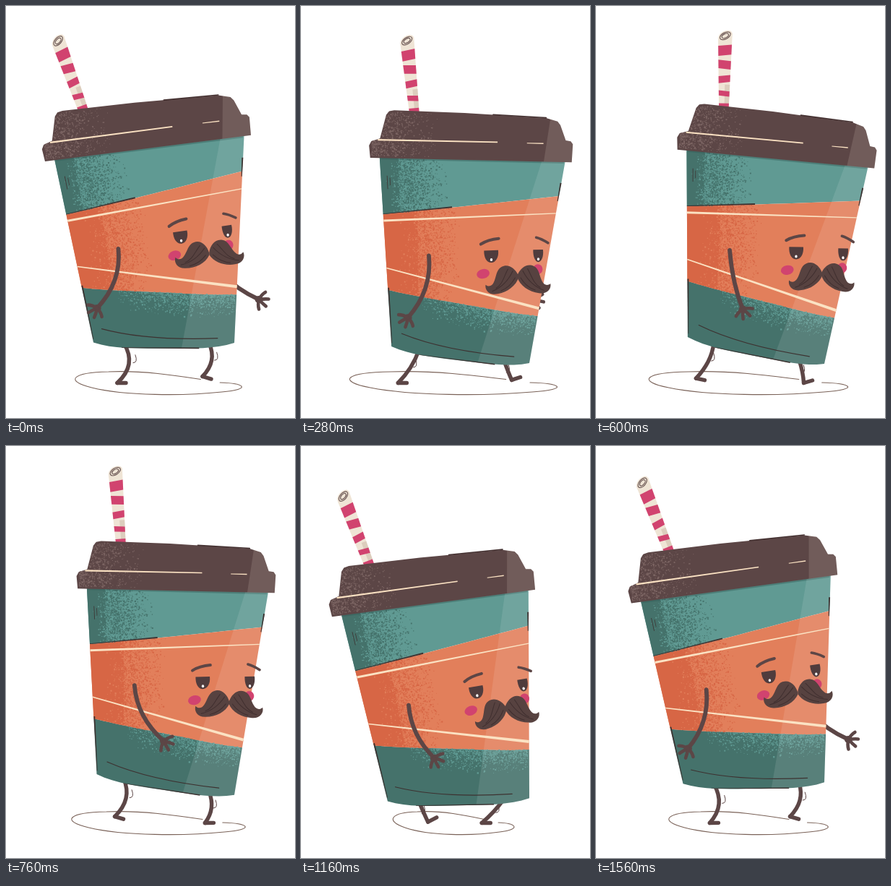
These frames come from a looping animation (400x570 px, 1.6 s). An HTML page with a canvas:

```html
<!DOCTYPE html>
<html lang="en">
<head>
<meta charset="utf-8">
<title>Walking coffee cup</title>
<style>
html, body { margin: 0; width: 100%; height: 100%; overflow: hidden; background: #fff; }
canvas { display: block; width: 400px; height: 570px; }
</style>
</head>
<body>
<canvas id="stage" width="400" height="570"></canvas>
<script>
const ctx = document.getElementById('stage').getContext('2d');
const LOOP = 1600, STEP = 40, RAD = Math.PI / 180;
const INK = '#5c4646', TEAL = '#609a93', DEEP = '#45726b', ORANGE = '#e27f5b',
  RUST = '#d76645', CREAM = '#fbe2c3', PINK = '#d1436f', DARK = '#3d3231';

// One walk cycle: each part sways once and bobs twice (lags in degrees)
function poseAt(deg) {
  const sway = (mean, amp, lag) => mean + amp * Math.sin((deg - lag) * RAD);
  const bob = (amp, lag = 90) => amp * Math.sin((2 * deg - lag) * RAD);
  return {
    lidL: [sway(74, 40, 30), sway(215, -17, 28) + bob(8)],
    lidR: [sway(352, 34.5, 24), sway(202, 19, 32) + bob(13.6, 107)],
    baseL: [sway(123, 4, 30), sway(471, -12, 24) + bob(10.5, 80)],
    baseR: [316, sway(484, 11, 43) + bob(10.5)],
    straw: sway(43.5, 9, 36),
    face: [sway(294, 18.7, 44), sway(356.5, 11, 27) + bob(12)],
    faceTurn: sway(-5, 6, 30),
    tashL: sway(-11.5, 3, 0) + bob(-7.5),
    tashR: sway(5, 8, 40) + bob(5),
    hand: [sway(173, 47, 95), sway(423, 5, -90) + bob(10)],
    farHand: [sway(300, 50, -90), 406],
    stretch: sway(116, 32, 0)
  };
}

// Grain
let seed = 11;
const rnd = () => (seed = (seed * 16807) % 2147483647) / 2147483647;
const mix = (a, b, k) => a + (b - a) * k;
const lerp = (a, b, k) => [mix(a[0], b[0], k), mix(a[1], b[1], k)];
const edge1 = u => .305 - .13 * u;
const edge2 = u => .702 + .066 * u;
function grain(n, u0, u1, top, bottom, keep) {
  const out = [];
  while (out.length < n) {
    const k = rnd(), v = rnd();
    if (rnd() < keep(k, v)) {
      const u = mix(u0, u1, k);
      out.push([u, mix(top(u), bottom(u), v), .8 + 1.6 * rnd() * rnd()]);
    }
  }
  return out;
}
const start = () => .01, end = () => .98;
const fade = k => (1 - k) ** 1.5;
const rise = k => k * k;
const specks = [
  [DEEP, grain(1250, .09, .38, start, edge1, fade)],
  [TEAL, grain(190, .02, .13, start, edge1, rise)],
  [RUST, grain(1600, .19, .48, edge1, edge2, fade)],
  [ORANGE, grain(260, .04, .24, edge1, edge2, rise)],
  [TEAL, grain(1000, .2, .99, edge2, end, (k, v) => Math.max(0, 1 - v * 1.8) ** 2 * Math.min(1, k * 2))]
];
const lidSpecks = grain(750, 2, 100, () => -64, () => -2, fade)
  .filter(([x, y]) => x > (y > -25 ? 0 : 14 - (y + 27) * .25));

// Drawing helpers
const sweep = (f, a, b, n = 18) => Array.from({ length: n + 1 }, (_, i) => f(mix(a, b, i / n)));
function stroke(color, width) {
  ctx.strokeStyle = color;
  ctx.lineWidth = width;
  ctx.stroke();
}
function fill(pts, color) {
  ctx.beginPath();
  pts.forEach(p => ctx.lineTo(...p));
  ctx.closePath();
  ctx.fillStyle = color;
  ctx.fill();
}
function bow(a, c, b, width, color = INK) {
  ctx.beginPath();
  ctx.moveTo(...a);
  ctx.quadraticCurveTo(...c, ...b);
  stroke(color, width);
}
const line = (a, b, width, color) => bow(a, a, b, width, color);
// Line whose thickness changes from one end to the other
function taper(a, b, wa, wb, color) {
  const d = Math.hypot(b[0] - a[0], b[1] - a[1]);
  const nx = (a[1] - b[1]) / d / 2, ny = (b[0] - a[0]) / d / 2;
  const off = (p, w) => [p[0] + nx * w, p[1] + ny * w];
  fill([off(a, wa), off(b, wb), off(b, -wb), off(a, -wa)], color);
}
function blob([x, y], rx, ry, color, turn = 0) {
  ctx.beginPath();
  ctx.ellipse(x, y, rx, ry, turn, 0, 7);
  ctx.fillStyle = color;
  ctx.fill();
}
function dust(color, list, place) {
  ctx.fillStyle = color;
  list.forEach(([u, v, s]) => {
    const [x, y] = place(u, v);
    ctx.fillRect(x - s / 2, y - s / 2, s, s);
  });
}

function drawGround(w) {
  const x = 211.5;
  ctx.beginPath();
  ctx.moveTo(x + w * .73, 521);
  ctx.bezierCurveTo(x + w * 1.02, 522, x + w * 1.12, 530, x + w * .75, 534);
  ctx.bezierCurveTo(x + w * .3, 539.5, x - w * .4, 539.5, x - w * .8, 528);
  ctx.bezierCurveTo(x - w * 1.12, 519, x - w * 1.05, 507, x - w * .6, 506);
  ctx.bezierCurveTo(x - w * .2, 504, x + w * .2, 511, x + w * .5, 516.5);
  stroke('#7a6258', 1.1);
}

function drawLeg(deg, hip, x0) {
  const s = Math.sin(deg * RAD), lift = 9 * Math.max(0, -Math.cos(deg * RAD));
  const heel = [x0 - 22 * s, 521.5 - lift];
  const toe = [heel[0] + 12, heel[1] + .4 * lift - 7 * Math.max(0, -s) ** 2];
  const bulge = Math.max(0, heel[1] - hip[1] - 26) * .8 * (1 - .7 * Math.abs(s));
  const knee = [(hip[0] + heel[0]) / 2 + bulge, (hip[1] + heel[1]) / 2 + 2];
  bow(hip, knee, heel, 5.4);
  line(heel, toe, 5.4);
  const [x, y] = lerp(knee, hip, .25);
  bow([x + 2, y - 6], [x + 6, y + 5], [x - 1, y + 5], 1);
}

function drawArm(from, hand, bend) {
  const c = [(from[0] + hand[0]) / 2 + bend, (from[1] + hand[1]) / 2 + 5];
  const a = Math.atan2(hand[1] - c[1], hand[0] - c[0]);
  const at = (turn, r) => [hand[0] + r * Math.cos(a + turn), hand[1] + r * Math.sin(a + turn)];
  bow(from, c, hand, 5.8);
  blob(hand, 5.5, 5, INK);
  for (let i = 0; i < 4; i++) {
    const turn = -1.25 + .8 * i;
    bow(hand, at(turn * 1.2, 8), at(turn, 13.5), 4.6);
  }
}

const TASH = new Path2D('M0 2C-2-8-10-17-20-14C-28-12-30-2-35 4C-38 8-43 10-47 5C-50 12-45 21-34 21C-20 22-6 16 0 5Z');
const HAIRS = new Path2D('M-6-5C-16 8-28 14-40 16M-12-9C-20 0-24 10-34 13M-5 5C-13 14-21 17-28 18');
function drawTash(side, turn) {
  ctx.save();
  ctx.rotate(turn * RAD);
  ctx.scale(side, 1);
  ctx.fillStyle = '#574240';
  ctx.fill(TASH);
  ctx.strokeStyle = '#402f2f';
  ctx.lineWidth = 1;
  ctx.stroke(HAIRS);
  ctx.restore();
}

function drawEye(x, y, r) {
  ctx.beginPath();
  ctx.moveTo(x - r, y - 8);
  ctx.lineTo(x + r, y - 8);
  ctx.bezierCurveTo(x + r + 1, y + 2, x + r * .6, y + 9, x, y + 9);
  ctx.bezierCurveTo(x - r * .7, y + 9, x - r - .5, y + 1, x - r, y - 8);
  ctx.fillStyle = '#503c3d';
  ctx.fill();
  blob([x, y + 5], 1.7, 2, '#fff');
}

function drawFace(p) {
  ctx.save();
  ctx.translate(...p.face);
  ctx.save();
  ctx.rotate(p.faceTurn * RAD);
  blob([-48, -1], 9, 6.5, PINK, -.2);
  blob([28, -5], 6.5, 7, PINK);
  drawEye(-36, -25, 9.8);
  drawEye(29, -24, 6.8);
  bow([-50, -42], [-40, -48], [-25, -49], 4);
  bow([27, -49], [34, -47], [43, -41], 3.6);
  ctx.restore();
  drawTash(1, p.tashL);
  drawTash(-1, p.tashR);
  ctx.restore();
}

function drawStraw(lid, tipX) {
  const tip = lid(tipX, -163), base = lid(60, -64);
  const a = Math.atan2(base[1] - tip[1], base[0] - tip[0]);
  const at = (k, side) => {
    const c = lerp(tip, base, k), w = mix(9.8, 6.8, k) * side;
    return [c[0] + Math.sin(a) * w, c[1] - Math.cos(a) * w];
  };
  const band = (k0, k1, color, skew = 0, left = -1) =>
    fill([at(k0 + skew, left), at(k0 - skew, 1), at(k1 - skew, 1), at(k1 + skew, left)], color);
  band(0, 1, '#efe4d5', .04);
  band(.68, 1, '#dccdbd', 0, .1);
  // Stripes get thinner towards the lid
  for (let i = 0; i < 4; i++) band(.13 + .212 * i, .27 + .19 * i, PINK, i % 2 ? -.008 : .01);
  band(.94, 1, PINK);
  const turn = a - Math.PI / 2 - .5;
  blob(tip, 10.5, 6.5, '#efe4d5', turn);
  for (const r of [8, 5]) {
    ctx.beginPath();
    ctx.ellipse(...tip, r, r * .55, turn, 0, 7);
    stroke('#6d5956', 1.2);
  }
}

function drawLid(lid) {
  const at = pts => pts.map(p => lid(...p));
  const side = [[260, -56], [264, -51], [272, -30], [279, -29], [282, -25], [281, 0]];
  fill(at([[0, 0], [-2, -17], [1, -23], [13, -27], [21, -60], [25, -65], [32, -66.5], [130, -65], [244, -60.5], ...side]), INK);
  dust('#7c6563', lidSpecks, lid);
  fill(at([[242, 0], [250, -60], ...side]), 'rgba(255,235,220,.13)');
  line(lid(170, -63.5), lid(244, -61), 1.6, '#443131');
  taper(lid(10, -25), lid(177, -25.5), 2.2, 1.6, CREAM);
  taper(lid(218, -25), lid(241, -25), 1, 1.5, CREAM);
}

function drawBody(q) {
  const top = u => q(u, 0), low = u => q(u, 1);
  const e1 = u => q(u, edge1(u)), e2 = u => q(u, edge2(u));
  const band = (f, g, b, color) => fill([...sweep(f, 0, b), ...sweep(g, b, 0)], color);
  band(top, e1, 1, TEAL);
  band(e1, e2, 1, ORANGE);
  band(e2, low, 1, DEEP);
  band(top, e1, .1, DEEP);
  band(e1, e2, .2, RUST);
  specks.forEach(([color, list]) => dust(color, list, q));

  line(q(.01, .01), q(.99, .01), 2.5, 'rgba(52,92,87,.45)');
  fill([top(.875), ...sweep(low, .625, 1), top(1)], 'rgba(255,255,255,.1)');

  taper(q(0, .338), q(1, .26), 3, 1.2, CREAM);
  taper(q(0, .587), q(1, .73), 1.5, 4, CREAM);

  taper(q(0, .302), q(.4, edge1(.4) - .002), .8, 2, DARK);
  taper(q(.005, .69), q(.005, .98), 1.8, .8, DARK);
  taper(q(.997, .11), q(.997, .2), 2, 1, DARK);
  taper(q(.035, .1), q(.035, .17), .8, .8, DARK);
  taper(q(.05, .11), q(.05, .15), .7, .7, DARK);
  bow(q(.08, .915), q(.38, .965), q(.88, .962), 1.2, DARK);
  taper(q(.2, 1), q(.75, 1), .6, 1.6, DARK);
}

function draw(t) {
  const deg = t / LOOP * 360, p = poseAt(deg);
  const [x0, y0] = p.lidL, dx = p.lidR[0] - x0, dy = p.lidR[1] - y0, len = Math.hypot(dx, dy);
  // The lid is stiff; the cup below it stretches down to the base
  const lid = (x, y) => [x0 + dx * x / 280 - dy / len * y, y0 + dy * x / 280 + dx / len * y];
  const tl = lid(13, -2), tr = lid(272, -2);
  const q = (u, v) => {
    const [x, y] = lerp(lerp(tl, p.baseL, v), lerp(tr, p.baseR, v), u);
    return [x, y + 8 * (1 - (2 * u - 1) ** 4) * v ** 4];
  };

  ctx.fillStyle = '#fff';
  ctx.fillRect(0, 0, 400, 570);
  ctx.lineCap = ctx.lineJoin = 'round';

  drawGround(p.stretch);
  drawLeg(deg + 180, [281, q(.83, 1)[1] - 6], 272);
  drawLeg(deg, [163, q(.2, 1)[1] - 6], 154);
  drawArm(q(.9, .66), p.farHand, -4);
  drawStraw(lid, p.straw);
  drawBody(q);
  drawLid(lid);
  drawFace(p);
  const shoulder = q(.268, .505);
  drawArm(shoulder, p.hand, 4 - .52 * (p.hand[0] - shoulder[0]));
}

function tick() {
  draw(Math.floor(performance.now() % LOOP / STEP) * STEP);
  requestAnimationFrame(tick);
}
tick();
</script>
</body>
</html>
```
